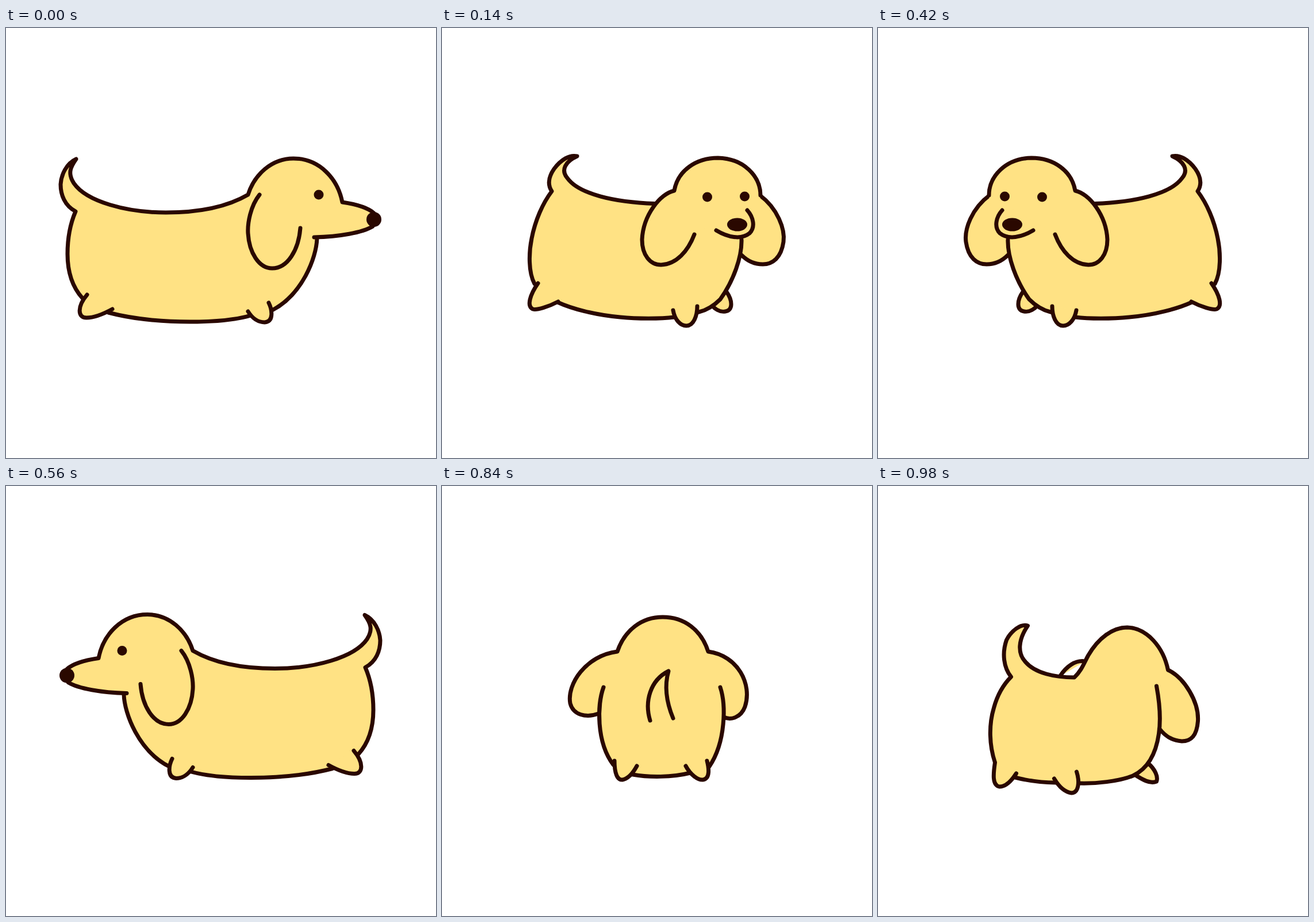
Write an HTML page that moves like this. It is 748 by 748 pixels and loops after 1.12 s.

```html
<!DOCTYPE html>
<html lang="en">
<head>
<meta charset="utf-8">
<title>Turning dog</title>
<style>
  html, body { margin: 0; width: 100%; height: 100%; overflow: hidden; background: #fff; }
  svg { display: block; width: 100%; height: 100%; }
  path { fill: #ffe284; stroke: #2a0800; stroke-width: 7; stroke-linecap: round; stroke-linejoin: round; }
  .line { fill: none; }
  .skin { stroke: none; }
  circle, ellipse { fill: #2a0800; }
  .pose {
    visibility: hidden;
    animation: show 1120ms step-end infinite;
    animation-delay: calc(var(--i) * 140ms - 1120ms);
  }
  @keyframes show {
    0% { visibility: visible; }
    12.5%, 100% { visibility: hidden; }
  }
</style>
</head>
<body>
<svg viewBox="0 0 748 748">
  <!-- side -->
  <g class="pose" style="--i:0">
    <g id="side">
      <path d="M541 366C540 400 515 464 463 491L426 500C395 509 350 511 320 511C270 511 220 506 178 495L133 470C115 450 107 425 107 393C107 365 112 340 121 319C102 309 95 290 95 272C96 255 105 236 122 228C112 242 107 253 118 270C140 302 210 321 278 321C335 321 385 311 421 290C432 255 462 227 500 227C545 227 577 262 585 303C612 307 630 313 640 322L638 345C620 356 580 363 536 364"/>
      <path d="M185 489C165 500 150 504 140 504C124 504 124 484 141 464"/>
      <path d="M421 493C429 506 440 512 450 512C466 511 463 490 457 478"/>
      <path class="line" d="M441 290C425 310 420 340 421 357C423 391 440 418 463 418C490 418 509 386 512 348"/>
      <circle cx="544" cy="290" r="8.5"/>
      <circle cx="640" cy="333" r="13"/>
    </g>
  </g>

  <!-- three-quarter front -->
  <g class="pose" style="--i:1">
    <g id="front-turn">
      <path d="M553 291C584 314 597 350 594 372C590 400 575 411 558 411C540 411 528 402 521 395"/>
      <path d="M495 459C505 473 507 491 493 493C483 495 474 488 469 482"/>
      <path class="skin" d="M404 283L554 291L545 350L523 390L439 359Z"/>
      <path d="M521 368C522 398 507 440 484 472C472 484 460 491 447 494L404 503C380 506 340 506 310 503C265 499 225 488 201 477L161 445C150 425 151 390 156 366C162 335 175 305 191 284C183 272 186 258 195 245C207 229 222 220 235 223C215 232 206 247 218 261C238 289 300 303 370 305.5"/>
      <path class="skin" d="M168 444L195 440L215 470L202 475L175 480Z"/>
      <path d="M202 476C185 485 165 491 158 489C147 484 153 464 167 444"/>
      <path d="M402 491C405 508 415 518 425 518C438 518 444 500 444 484"/>
      <path d="M439 359C428 388 408 411 381 412C362 412 348 395 348 368C350 325 380 288 404 283C410 248 442 226 480 226C525 227 554 258 554 291"/>
      <path class="line" d="M531 317C541 328 546 346 535 357C520 369 497 364 477 352"/>
      <ellipse cx="513.5" cy="342" rx="17.5" ry="11.5"/>
      <circle cx="461.5" cy="294" r="8.5"/>
      <circle cx="526.5" cy="293" r="8.5"/>
    </g>
  </g>

  <!-- front -->
  <g class="pose" style="--i:2">
    <path class="skin" d="M300 350H450L491 412H272Z"/>
    <path d="M272 396C273 435 280 468 298 485L332 501C360 506 400 506 432 498L465 488C480 470 489 440 491 409"/>
    <path id="paw-l" d="M300 478C300 500 305 512 314 511C325 509 333 498 339 487"/>
    <path id="paw-r" d="M424 487C432 502 445 512 454 511C467 509 464 490 461 478"/>
    <path d="M310 370C285 395 250 404 230 390C216 375 218 345 232 325C250 299 285 282 309 284C320 248 350 227 385 227C422 227 452 250 464 285C490 286 520 320 528 350C533 385 520 408 497 408C475 406 455 390 440 366"/>
    <path class="line" d="M356 342C362 354 373 360 385 360C400 360 411 353 415 340"/>
    <ellipse cx="386" cy="336" rx="19" ry="12.5"/>
    <circle cx="344" cy="294" r="8.5"/>
    <circle cx="421.5" cy="293" r="8.5"/>
  </g>

  <g class="pose" style="--i:3"><use href="#front-turn" transform="translate(747 0) scale(-1 1)"/></g>

  <g class="pose" style="--i:4"><use href="#side" transform="translate(746 -3.5) scale(-1 1)"/></g>

  <!-- three-quarter back -->
  <g class="pose" style="--i:5">
    <g id="back-turn">
      <path d="M388 299C405 296 421 308 432 325"/>
      <path d="M279 476C266 487 261 500 264 508C275 513 290 504 302 496"/>
      <path d="M264 342C257 380 257 405 260 425C265 460 280 486 305 498C330 508 370 512 400 511L440 510C465 510 490 506 510 501L545 475C555 445 556 410 547 380C541 358 532 341 517 326C530 310 533 285 525 262C517 246 500 233 488 237C505 262 506 285 492 300C475 320 440 327 407 327C395 316 390 302 383 289C365 258 340 240 315 240C280 241 252 275 244 314C215 328 190 370 192 403C194 430 205 438 220 438C238 437 250 428 259 416"/>
      <path d="M403 491C397 510 400 528 412 528C425 526 435 515 442 503"/>
      <path class="skin" d="M508 492L520 468H538L545 476L530 508Z"/>
      <path d="M508 494C517 508 527 517 537 517C550 515 548 495 545 475"/>
    </g>
  </g>

  <!-- back -->
  <g class="pose" style="--i:6">
    <path d="M272 396C250 404 228 398 223 378C217 345 250 295 305 288C318 250 348 228 384 228C421 228 451 250 463 288C515 295 540 345 527 384C520 403 502 408 490 402"/>
    <path d="M281 350C270 380 268 445 298 485L332 502C360 507 400 507 432 499L465 488C494 445 494 380 484 350"/>
    <use href="#paw-l"/>
    <use href="#paw-r"/>
    <path d="M362 408C352 375 362 338 394 322C386 350 392 380 402 404"/>
  </g>

  <g class="pose" style="--i:7"><use href="#back-turn" transform="translate(748.5 6) scale(-1 1)"/></g>
</svg>
</body>
</html>
```
